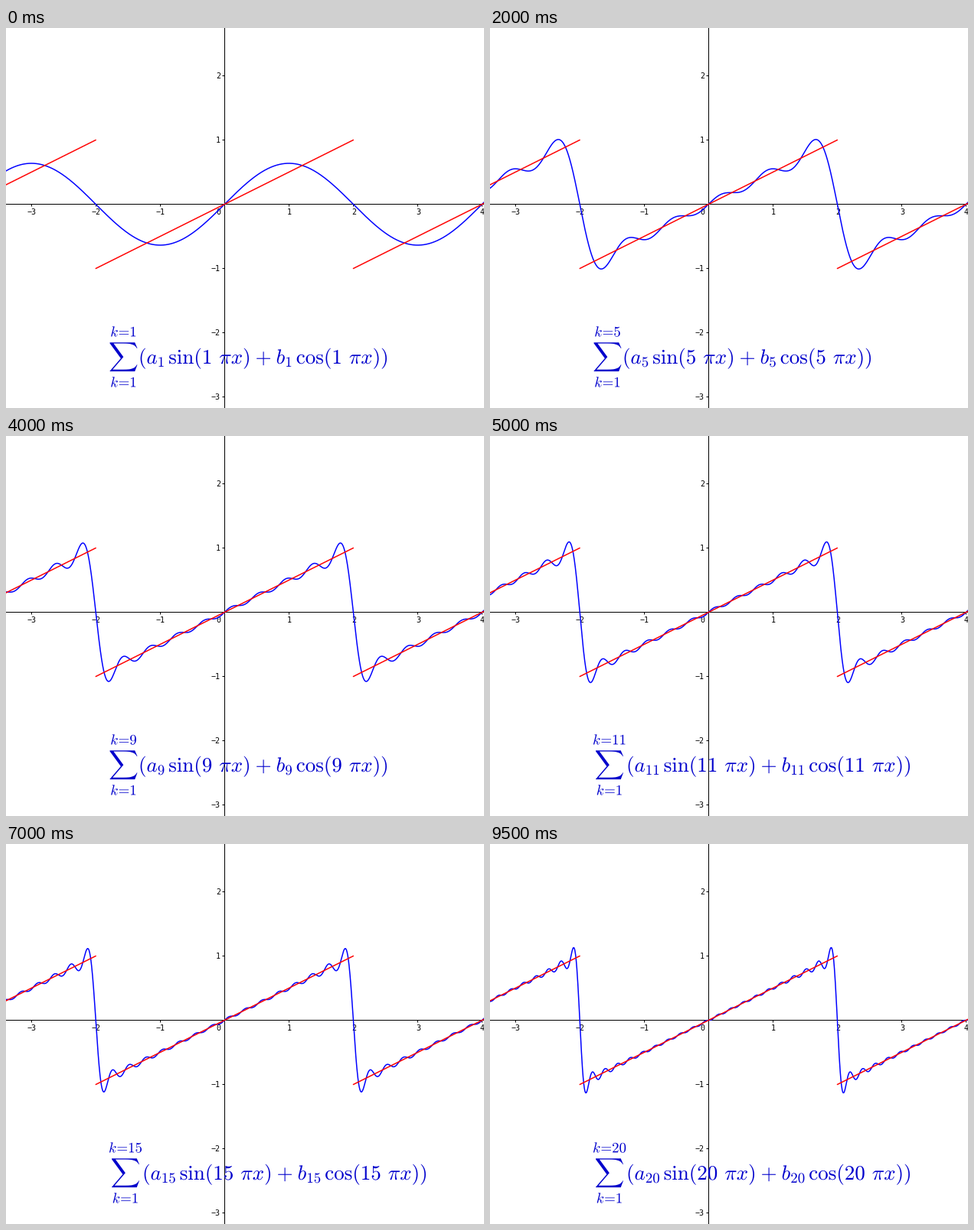
A matplotlib script for the animation above (10000 ms loop, 624 by 497 pixels).

```python
import numpy as np
import matplotlib.pyplot as plt
from matplotlib.animation import FuncAnimation
from matplotlib.patches import PathPatch
from matplotlib.path import Path
from matplotlib.textpath import TextPath
from matplotlib.transforms import Affine2D

W, H, DPI = 624, 497, 72      # at 72 dpi one point is one pixel
X0, Y0, UNIT = 285.3, 230.5, 84.05
TERMS = 20
EM = 27
SCRIPT = 0.7
INK = "#0000cc"

plt.rcParams["mathtext.fontset"] = "cm"
plt.rcParams["font.family"] = "DejaVu Sans Mono"

fig = plt.figure(figsize=((W + 1e-6) / DPI, (H + 1e-6) / DPI), dpi=DPI,
                 facecolor="white")
ax = fig.add_axes([0, 0, 1, 1])
ax.set_xlim(0, W)
ax.set_ylim(H, 0)
ax.axis("off")


def px(x):
    return X0 + UNIT * np.asarray(x)


def py(y):
    return Y0 - UNIT * np.asarray(y)


def crisp(v):
    """Centre of the pixel that holds v."""
    return np.floor(v) + 0.5


def stroke(xs, ys, color, width, z, cap="round"):
    return ax.plot(xs, ys, color=color, lw=width, zorder=z, snap=False,
                   solid_capstyle=cap, solid_joinstyle="round")[0]


def hairline(xs, ys):
    stroke(xs, ys, "black", 1, 1, "butt")


def label(x, y, value, align):
    ax.text(x, y, str(value).replace("-", "\u2212"), size=10, ha=align,
            va="baseline", color="black", zorder=2)


def draw_axes():
    cx, cy = crisp(X0), crisp(Y0)
    hairline([0, W], [cy, cy])
    hairline([cx, cx], [0, H])
    for v in range(-3, 5):
        if v:
            x = crisp(px(v))
            hairline([x, x], [cy, cy + 3])
            label(x + 0.5, 244, v, "center")
    for v in range(-3, 3):
        if v:
            y = crisp(py(v))
            hairline([cx - 3, cx], [y, y])
            label(280, y + 3.5, v, "right")
    label(280, 244, 0, "right")


def draw_sawtooth():
    for centre in (-4, 0, 4):
        x = np.array([centre - 2, centre + 2])
        stroke(px(x), py((x - centre) / 2), "red", 1.5, 4)


def glyphs(tex, x, y, scale=1):
    path = TextPath((0, 0), f"${tex}$", size=EM * scale)
    return path.transformed(Affine2D().scale(1, -1).translate(x, y))


def sum_sign(x, y, height):
    """Summation sign centred on (x, y), enlarged evenly to a height."""
    path = TextPath((0, 0), r"$\sum$", size=EM)
    box = path.get_extents()
    zoom = height / box.height
    return path.transformed(
        Affine2D().translate(-(box.x0 + box.x1) / 2, -(box.y0 + box.y1) / 2)
        .scale(zoom, -zoom).translate(x, y))


def limit_width(k):
    return (1.33 + 0.5 * len(str(k))) * SCRIPT * EM


def limit(k, mid, y):
    tex = rf"k\hspace{{-.165}}=\hspace{{-.2}}{k}"
    return glyphs(tex, mid - limit_width(k) / 2, y, SCRIPT)


def formula(n):
    digits = 0.5 * len(str(n))
    left, base, sub_base = 134, 439, 443
    box = max(1.444 * EM, limit_width(n))
    mid = left + box / 2
    parts = [sum_sign(mid, 430.2, 1.4 * EM),
             limit(n, mid, 403.5), limit(1, mid, 469.5)]

    # Each piece: text and its advance in ems, followed by a subscript
    argument = rf"({n}\hspace{{.38}}\pi x)"
    pieces = [
        ("(a", 0.918),
        (rf"\mathrm{{sin}}{argument}\hspace{{.053}}+\hspace{{.053}}b",
         5.132 + digits)]
    x = left + box
    for tex, advance in pieces:
        parts.append(glyphs(tex, x, base))
        x += advance * EM
        parts.append(glyphs(str(n), x, sub_base, SCRIPT))
        x += (SCRIPT * digits + 0.185) * EM
    parts.append(glyphs(rf"\mathrm{{cos}}{argument})", x, base))
    return Path.make_compound_path(*parts)


def partial_sum(x, n):
    k = np.arange(1, n + 1)[:, None]
    return (2 / np.pi * (-1.0) ** (k + 1) / k
            * np.sin(k * np.pi * x / 2)).sum(axis=0)


draw_axes()
draw_sawtooth()
xs = np.linspace(-3.45, 4.1, 1500)
curve = stroke(px(xs), py(partial_sum(xs, 1)), "blue", 1.5, 3)
text = ax.add_patch(PathPatch(formula(1), facecolor=INK, edgecolor="none",
                              lw=0, zorder=5))


def update(i):
    n = i + 1
    curve.set_ydata(py(partial_sum(xs, n)))
    text.set_path(formula(n))
    return curve, text


anim = FuncAnimation(fig, update, frames=TERMS, interval=500, repeat=True)
plt.show()
```
